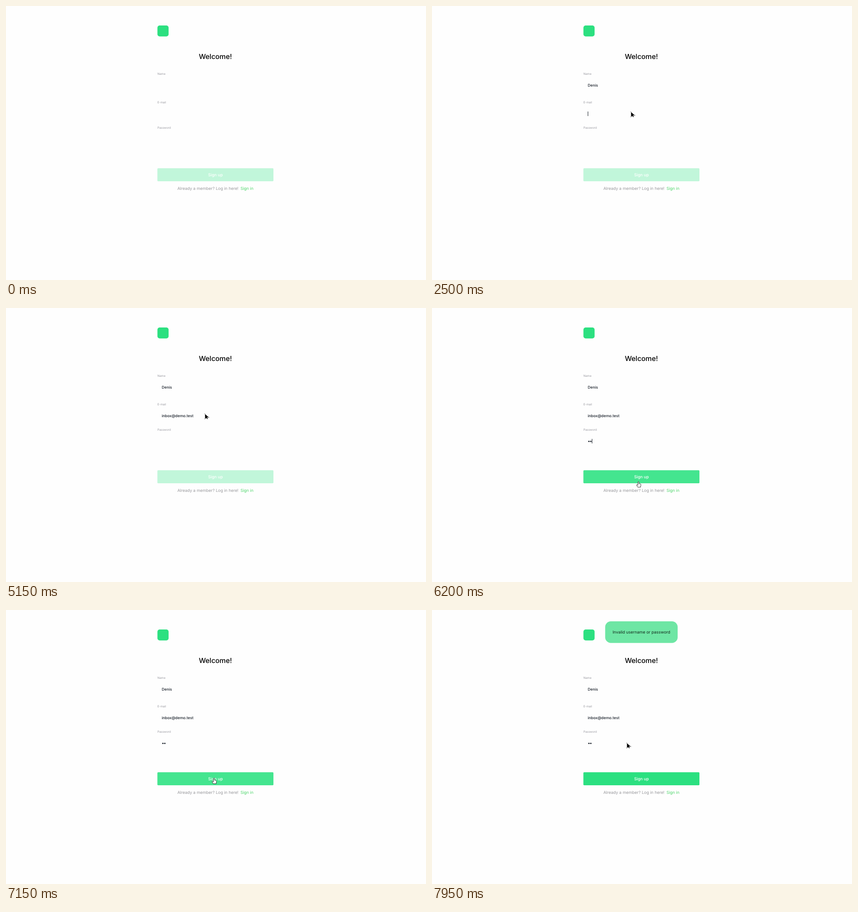
These frames come from a looping animation (925 by 605 pixels, 8000 ms). An HTML page:

```html
<!DOCTYPE html>
<html lang="en">
<head>
<meta charset="utf-8">
<title>Sign up form</title>
<style>
  html, body { margin: 0; width: 100%; height: 100%; overflow: hidden; background: #fefefe; }
  svg { display: block; width: 925px; height: 605px; font: 8.96px Inter, sans-serif; text-rendering: geometricPrecision; }
  .title { font-size: 15.36px; font-weight: 500; }
  .label { font-size: 6.4px; fill: #98989f; }
  .input { font-size: 8.32px; font-weight: 500; fill: #151c26; }
  .middle { text-anchor: middle; }
  .error { fill: #ee3962; }
</style>
</head>
<body>
<svg viewBox="0 0 925 605">
  <rect width="925" height="605" fill="#fefefe"/>
  <rect x="333.5" y="43" width="24.6" height="24.3" rx="5" fill="#2ce080"/>
  <text class="title middle" x="461.2" y="116.8">Welcome!</text>

  <text class="label" x="333.4" y="152.3">Name</text>
  <text class="input" id="name" x="343" y="178.1"></text>
  <text class="label" x="333.4" y="215.2">E-mail</text>
  <text class="input" id="email" x="343" y="241.1"></text>
  <text class="label error" id="error" x="333.4" y="264.4">Enter valid email</text>

  <g id="lower">
    <text class="label" x="333.4" y="271.1">Password</text>
    <rect id="button" x="333.4" y="358.3" width="255.6" height="28.8" rx="1.8"/>
    <text class="middle" x="461.3" y="375.8" font-weight="500" fill="#fff">Sign up</text>
    <text x="377.4" y="406.2" fill="#98989c">Already a member? Log in here!</text>
    <text x="516.4" y="406.2" fill="#4fd66c">Sign in</text>
  </g>

  <g id="dots" fill="#151c26">
    <circle cx="345.6" cy="294.4" r="1.5"/>
    <circle cx="349.8" cy="294.4" r="1.5"/>
  </g>
  <rect id="caret" width="1" height="10"/>

  <g id="toast">
    <rect x="381.4" y="25" width="159.6" height="47.7" rx="12.5" fill="#6ee6a4"/>
    <text class="middle" x="461.2" y="52.1" fill="#12291c">Invalid username or password</text>
  </g>

  <g id="arrow">
    <path d="M.5 .5V12.5L3.6 9.9L5.2 12.8L7.2 11.8L6 8.8H9.8Z" fill="#000" stroke="#fff" stroke-width=".8"/>
    <path d="M0 0h1v1h-1zM0 11.6h1v1h-1zM8.6 7.7h1.2v1.2h-1.2z" fill="#222"/>
  </g>
  <path id="hand" fill="#fff" stroke="#222" stroke-width=".9" stroke-linejoin="round"
    d="M-1.5 1.3Q-1.5 .3 -.4 .3T.7 1.3V4.6L4 5.4Q5.4 5.9 5.2 7.6L4.4 11V12.6H-1.8L-4.4 8.7Q-5 7 -3.6 7L-1.5 8.5Z"/>
</svg>
<script>
const LOOP = 8000, STEP = 50;
const $ = id => document.getElementById(id);
const show = (id, on) => $(id).setAttribute('visibility', on ? 'visible' : 'hidden');
const clamp = v => Math.max(0, Math.min(1, v));

// Moments at which each character is entered.
const name = { text: 'Denis', keys: [800, 1100, 1250, 1250, 1450] };
const email = {
  text: 'inbox@demo.test',
  keys: [2750, 2900, 2950, 3100, 3200, 3550, 3800, 3850, 4150, 4200, 4350, 4450, 4550, 4650, 4750]
};
const passwordKeys = [5650, 5800];
const VALID_AT = 4650, ENABLED_AT = 5650;

// Pointer stops: time, x, y.
const pointer = [
  [100, 462, -16], [650, 453, 174], [1750, 453, 174], [1800, 453.5, 181],
  [2150, 438, 232], [2300, 437.5, 233], [5150, 437.5, 233], [5350, 429, 294],
  [5800, 429, 294], [6050, 453, 394], [6200, 455, 383], [6500, 457, 374],
  [6750, 458.5, 371], [7650, 458.5, 371], [7850, 440, 325], [7950, 428.5, 293]
];

// Focus periods: start, end, caret top and caret position.
const carets = [
  [650, 1800, 170, () => typedEnd('name')],
  [2500, 5150, 233, () => typedEnd('email')],
  [5500, 7000, 289, t => 343 + 4.5 * count(passwordKeys, t)]
];

const count = (keys, t) => keys.filter(k => k <= t).length;
const typedEnd = id => Math.floor(343 + $(id).getComputedTextLength());

function pointerAt(t) {
  const next = pointer.findIndex(p => p[0] > t);
  if (next === 0) return [0, -50];
  if (next < 0) return pointer[pointer.length - 1].slice(1);
  const [t0, x0, y0] = pointer[next - 1], [t1, x1, y1] = pointer[next];
  const u = (t - t0) / (t1 - t0), e = u * u * (3 - 2 * u);
  return [x0 + (x1 - x0) * e, y0 + (y1 - y0) * e];
}

function render(t) {
  $('name').textContent = name.text.slice(0, count(name.keys, t));
  $('email').textContent = email.text.slice(0, count(email.keys, t));

  const invalid = t >= email.keys[0] && t < VALID_AT;
  $('email').classList.toggle('error', invalid);
  show('error', invalid);
  $('lower').setAttribute('transform', `translate(0 ${invalid ? 7.68 : 0})`);

  const dots = count(passwordKeys, t);
  [...$('dots').children].forEach((dot, i) => dot.setAttribute('opacity', i < dots ? 1 : 0));

  const caret = carets.find(([from, to]) => t >= from && t < to);
  show('caret', caret);
  if (caret) {
    $('caret').setAttribute('x', Math.floor(caret[3](t)));
    $('caret').setAttribute('y', caret[2]);
    $('caret').setAttribute('fill', invalid ? '#ee3962' : '#151c26');
  }

  const [x, y] = pointerAt(t);
  const hover = y >= 358 && y <= 387;
  for (const id of ['arrow', 'hand']) {
    show(id, hover === (id === 'hand'));
    $(id).setAttribute('transform', `translate(${x} ${y})`);
  }
  $('button').setAttribute('fill', t < ENABLED_AT ? '#c1f6da' : hover ? '#44e58f' : '#2be080');
  $('toast').setAttribute('opacity', clamp((t - 7200) / 450));
}

const start = performance.now();
function frame() {
  const t = (performance.now() - start) % LOOP;
  render(Math.floor(t / STEP) * STEP);
  requestAnimationFrame(frame);
}
frame();
</script>
</body>
</html>
```
